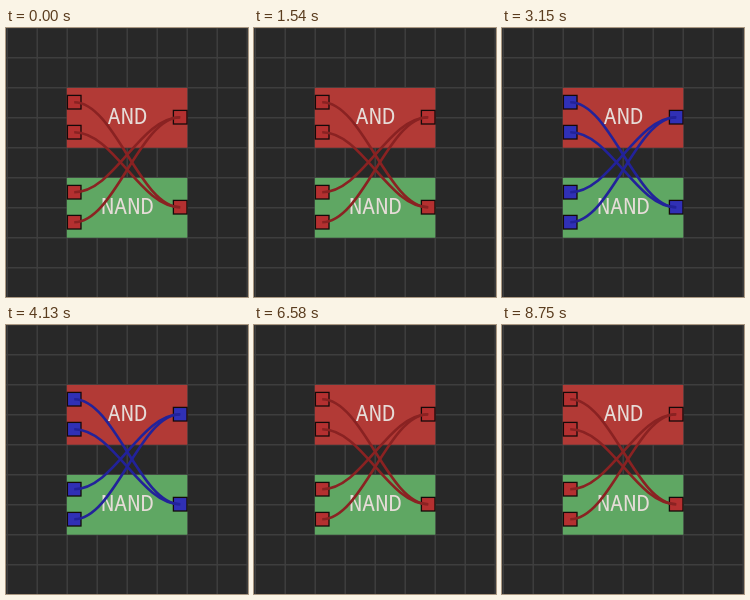
These frames come from a looping animation (242 by 269 pixels, 8.82 s). An HTML page:

```html
<!DOCTYPE html>
<html lang="en">
<head>
<meta charset="utf-8">
<title>Logic gates</title>
<style>
  html, body { margin: 0; width: 100%; height: 100%; overflow: hidden; background: #282828; }
  svg { display: block; width: 242px; height: 269px; }
  text { font: 500 22px "Noto Sans Mono", "DejaVu Sans Mono", monospace; fill: #e6dcd8; text-anchor: middle; }
  .grid { stroke: #3e3e3e; stroke-width: 1.5; }
  .pin { fill: var(--pin); stroke: #140a0a; stroke-width: 1.3; }
  .wire { fill: none; stroke: var(--wire); stroke-width: 2.6; }
  svg { --pin: #b43030; --wire: #8a2222; }
  svg.on { --pin: #3030b6; --wire: #22229a; }
</style>
</head>
<body>
<svg id="stage" viewBox="0 0 242 269"></svg>
<script>
const stage = document.getElementById("stage");

function add(tag, attrs, text) {
  const el = document.createElementNS("http://www.w3.org/2000/svg", tag);
  for (const key in attrs) el.setAttribute(key, attrs[key]);
  if (text) el.textContent = text;
  stage.append(el);
}

function gate(label, y, color) {
  add("rect", { x: 60.8, y, width: 120.5, height: 59.8, fill: color });
  add("text", { x: 121.3, y: y + 36.3 }, label);
}

function pin([x, y]) {
  add("rect", { class: "pin", x: x - 6.8, y: y - 6.8, width: 13.6, height: 13.6 });
}

function wire([x1, y1], [x2, y2]) {
  const pull = (x2 - x1) * 0.38;
  add("path", { class: "wire", d: `M${x1},${y1} C${x1 + pull},${y1} ${x2 - pull},${y2} ${x2},${y2}` });
}

let lines = "";
for (let p = 0; p <= 270; p += 30) lines += `M${p + 1.2},0V269M0,${p - 0.2}H242`;
add("path", { class: "grid", d: lines });

gate("AND", 59.9, "#b23a36");
gate("NAND", 149.9, "#5fa763");

const inputs = [74, 104, 164, 194].map(y => [68.2, y + 0.2]);
const outputs = [89, 179].map(y => [174.2, y + 0.2]);
[...inputs, ...outputs].forEach(pin);
inputs.forEach((from, i) => wire(from, outputs[i < 2 ? 1 : 0]));

// The signal flips every tick, except for one held tick late in the loop.
const TICK = 70, TICKS = 126, HOLD = 119;
const start = performance.now();

function draw(now) {
  const tick = Math.floor(Math.max(0, now - start) / TICK) % TICKS;
  const flips = tick < HOLD ? tick : tick - 1;
  stage.classList.toggle("on", flips % 2 === 1);
  requestAnimationFrame(draw);
}
draw(start);
</script>
</body>
</html>
```
